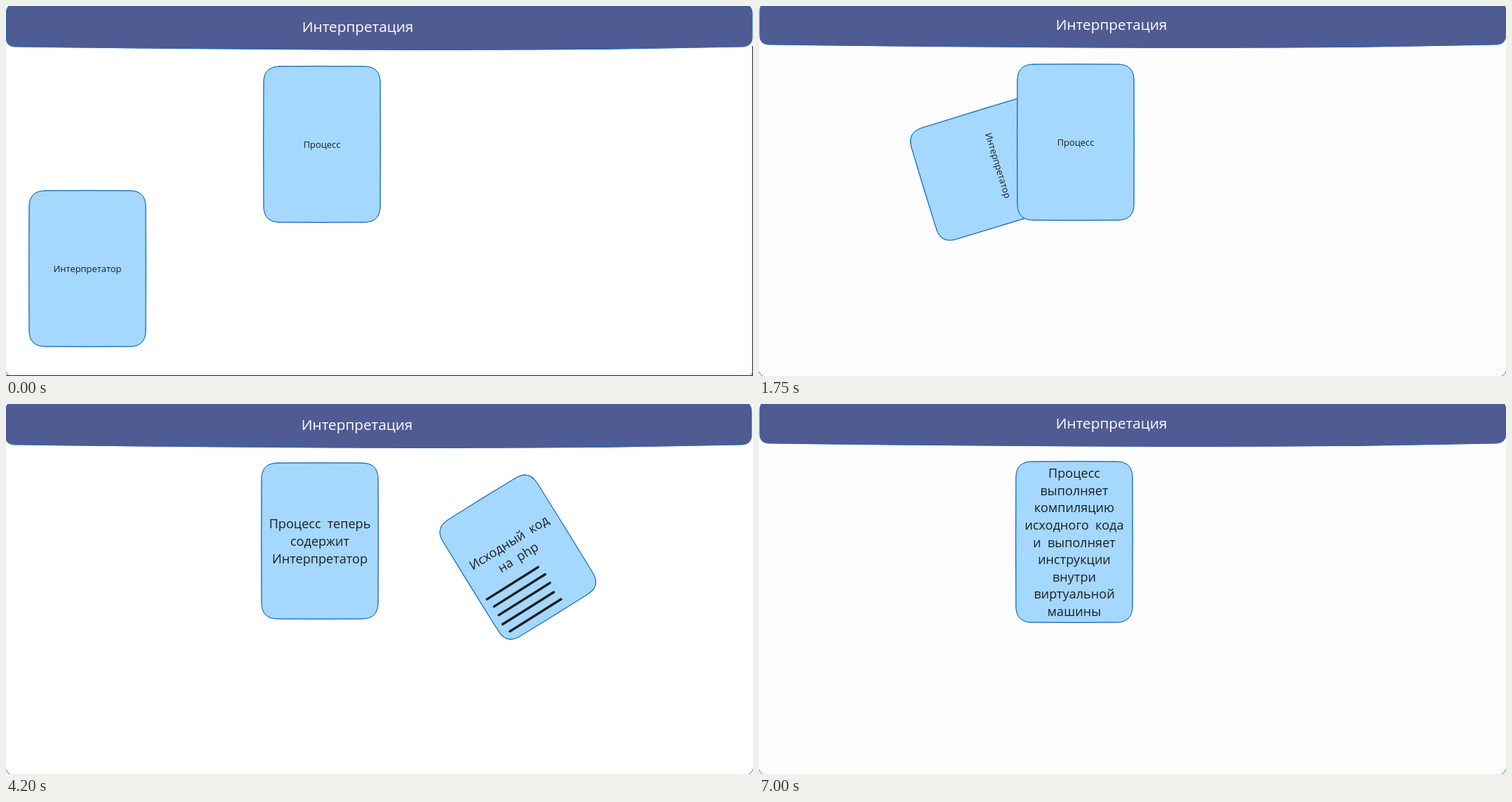
Write an HTML page that moves like this. It is 1064x527 px and loops after 8000 ms.

```html
<!DOCTYPE html>
<html lang="ru">
<head>
<meta charset="utf-8">
<title>Интерпретация</title>
<style>
  html, body { margin: 0; width: 100%; height: 100%; overflow: hidden; background: #fff; }
  svg { display: block; width: 100vw; height: 100vh; }
  text { font: 500 18.1px "Open Sans", "Noto Sans", sans-serif; word-spacing: 4.5px;
         text-anchor: middle; fill: #1e1e1e; }
  .small { font-size: 12.9px; }
  .title { font-size: 20.7px; fill: #fff; }
  .box { fill: #a5d8ff; }
  .ink { fill: none; stroke: #1971c2; stroke-width: .9; stroke-linecap: round; }
  .code { stroke: #1e1e1e; stroke-width: 3.4; stroke-linecap: round; }
</style>
</head>
<body>
<svg viewBox="0 0 1064 527" preserveAspectRatio="none">
  <rect id="paper" width="1064" height="527"/>
  <path id="edges" d="M1063.5 57V526.5H0" fill="none" stroke="#1e1e1e"/>
  <path class="ink" d="M0 521Q1 525 5 527M1064 520Q1063 525 1058 527"/>
  <g id="header">
    <path d="M0 10Q0 0 8 -3H1055Q1063 0 1063 10V46Q1062 57 1050 58Q850 63 640 63Q350 63 12 58Q0 57 0 46Z" fill="#4f5b93"/>
    <path class="ink" d="M8 0Q0 1 0 10V46Q1 57 12 58Q350 62 640 62Q850 62 1050 58Q1062 57 1063 46V10Q1063 1 1055 0"/>
    <text class="title" x="501" y="37">Интерпретация</text>
  </g>
  <g id="interpreter"></g>
  <g id="process"></g>
  <g id="source"></g>
</svg>
<script>
const $ = id => document.getElementById(id);
const LOOP = 8000, STEP = 350, HOLD = 3 * STEP, LINE = 24.55;
const JOINED = 2450, CODE_IN = 3500, CODE_READ = 5600, RUNNING = 6650;
const holds = [JOINED, CODE_READ, 7000];

// Key poses: time, x, y, angle
const drift = [[0, 0, 0], [1750, 1, -3], [JOINED, -1, 0], [CODE_READ, -1, 0], [7000, 1, -2]];
const interpreterPath = [[0, 116, 374, 0], [1050, 174, 347, 16], [1750, 341, 227, 73], [JOINED, 450, 196, 90]];
const sourcePath = [[CODE_IN, 820, 225, 0], [4900, 611, 209, -73], [CODE_READ, 448, 195, -90]];

const joined = ['Процесс теперь', 'содержит', 'Интерпретатор'];
const running = ['Процесс', 'выполняет', 'компиляцию', 'исходного кода', 'и выполняет',
                 'инструкции', 'внутри', 'виртуальной', 'машины'];

function processText(t) {
  if (t < JOINED) return ['Процесс'];
  if (t < CODE_READ) return joined;
  return t < RUNNING ? [...joined, 'и', 'Исходный код'] : running;
}

function poseAt(keys, t) {
  const next = keys.findIndex(key => key[0] > t);
  if (next < 0) return keys.at(-1).slice(1);
  const from = keys[Math.max(0, next - 1)], to = keys[next];
  const p = Math.max(0, (t - from[0]) / (to[0] - from[0])) ** 1.2;
  return from.slice(1).map((value, i) => value + (to[i + 1] - value) * p);
}

// Rounded outline around the origin; bow bends the sides slightly.
function outline(w, h, bow) {
  const x = w / 2, y = h / 2, r = 23;
  return `M${r - x} ${-y}Q0 ${-y - bow} ${x - r} ${-y}Q${x} ${-y} ${x} ${r - y}` +
    `Q${x + bow} 0 ${x} ${y - r}Q${x} ${y} ${x - r} ${y}` +
    `Q0 ${y + bow} ${r - x} ${y}Q${-x} ${y} ${-x} ${y - r}` +
    `Q${-x - bow} 0 ${-x} ${r - y}Q${-x} ${-y} ${r - x} ${-y}Z`;
}

function box(w, h) {
  return `<path class="box" d="${outline(w, h, 0)}"/>` +
    `<path class="ink" d="${outline(w, h, 1)}"/><path class="ink" d="${outline(w, h, 0)}"/>`;
}

function textBlock(lines, middle = 0) {
  const small = lines.length === 1;
  return lines.map((line, i) => {
    const y = middle + (i - (lines.length - 1) / 2) * LINE + (small ? 5 : 7);
    return `<text class="${small ? 'small' : ''}" y="${y}">${line}</text>`;
  }).join('');
}

function codeLines() {
  return Array.from({ length: 5 }, (_, i) => {
    const x = -67 + 2 * Math.sin(i * 2.2 - 1.5), y = 28 + 14 * i;
    return `<path class="code" d="M${x} ${y}l86 -.6"/>`;
  }).join('');
}

$('interpreter').innerHTML = box(166, 222) + textBlock(['Интерпретатор']);
$('source').innerHTML = box(158, 195) + textBlock(['Исходный код', 'на php'], -12.5) + codeLines();

const show = (id, on) => { $(id).style.display = on ? '' : 'none'; };
const move = (id, [x, y, angle = 0]) =>
  $(id).setAttribute('transform', `translate(${x} ${y}) rotate(${angle})`);

function draw(t) {
  const [dx, dy] = poseAt(drift, t);
  const height = t < RUNNING ? 222 : 229;
  const shift = t < JOINED ? 0 : -2;
  $('paper').setAttribute('fill', dy <= -1 ? '#fdfdfd' : '#fff');
  show('edges', t < 3 * STEP);
  move('header', [dx, dy]);
  $('process').innerHTML = box(166, height) + textBlock(processText(t));
  move('process', [450 + shift + dx, 86 + shift + dy + height / 2]);
  show('interpreter', t < JOINED);
  move('interpreter', poseAt(interpreterPath, t));
  show('source', t >= CODE_IN && t < CODE_READ);
  move('source', poseAt(sourcePath, t));
}

function stepTime(t) {
  return holds.find(start => t >= start && t < start + HOLD) ?? Math.floor(t / STEP) * STEP;
}

let current;
function tick() {
  const t = stepTime(performance.now() % LOOP);
  if (t !== current) draw(current = t);
  requestAnimationFrame(tick);
}
tick();
</script>
</body>
</html>
```
